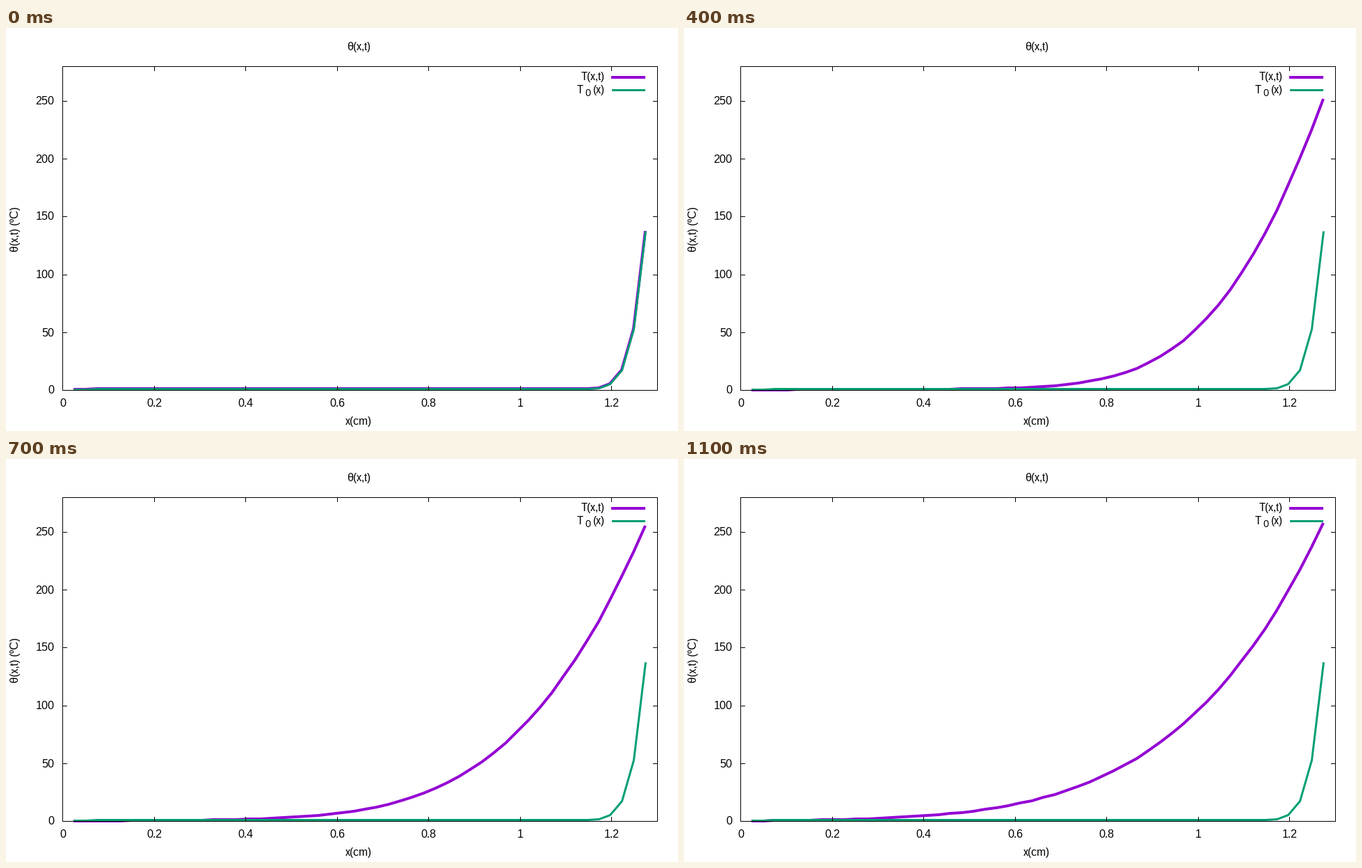
A matplotlib script for the animation above (1200 ms loop, 966x580 px).

```python
import numpy as np
import matplotlib.pyplot as plt
from matplotlib.animation import FuncAnimation

W, H, DPI = 966, 580, 100
PX = 72 / DPI                                # points per pixel
LEFT, RIGHT, TOP, BOTTOM = 81, 936, 55, 521
XMAX, YMAX = 1.3, 280
TICK = 6
PURPLE, GREEN = "#9400d3", "#009e73"
FRAMES, INTERVAL = 12, 100

# Heat equation with linear loss, implicit scheme on the interior nodes
NODES = 50
DX = XMAX / (NODES + 1)
RATE = 0.1135                                # D * dt / dx^2
LOSS = RATE * (3 * DX) ** 2
FIRST_STEPS, STEPS = 10, 100

SOLVE = np.linalg.inv((1 + 2 * RATE + LOSS) * np.eye(NODES)
                      - RATE * (np.eye(NODES, k=1) + np.eye(NODES, k=-1)))
WALL = np.zeros(NODES)
WALL[-1] = RATE * YMAX

plt.rcParams.update({"font.family": "Liberation Sans",
                     "text.hinting": "native",
                     "text.hinting_factor": 1})


def advance(temp, steps):
    for _ in range(steps):
        temp = SOLVE @ (temp + WALL)
    return temp


def to_px(x):
    return LEFT + (RIGHT - LEFT) * x / XMAX


def to_py(y):
    return BOTTOM - (BOTTOM - TOP) * y / YMAX


profiles = [advance(np.ones(NODES), FIRST_STEPS)]
while len(profiles) < FRAMES:
    profiles.append(advance(profiles[-1], STEPS))

node_x = np.floor(to_px(DX * np.arange(1, NODES + 1)))
curves = [np.round(to_py(p)) for p in profiles]

fig = plt.figure(figsize=(W / DPI, H / DPI), dpi=DPI, facecolor="white")
ax = fig.add_axes([0, 0, 1, 1])
ax.set_xlim(0, W)
ax.set_ylim(H, 0)
ax.axis("off")


def stroke(x, y, color, width, z):
    return ax.plot(x, y, color=color, lw=width * PX, solid_capstyle="butt",
                   solid_joinstyle="round", snap=False, zorder=z)[0]


def segment(x0, y0, x1, y1):
    """One-pixel black line covering both end pixels."""
    ax.fill([x0, x1 + 1, x1 + 1, x0], [y0, y0, y1 + 1, y1 + 1],
            color="black", lw=0, snap=False, zorder=5)


def label(x, y, text, ha="center", size=16, **kw):
    ax.text(x, y, text, ha=ha, va="baseline", fontsize=size * PX,
            color="black", zorder=6, **kw)


# Frame and ticks
for y in (TOP, BOTTOM):
    segment(LEFT, y, RIGHT, y)
for x in (LEFT, RIGHT):
    segment(x, TOP, x, BOTTOM)

for i in range(7):
    x = int(to_px(i / 5) + 0.5)
    segment(x, TOP, x, TOP + TICK)
    segment(x, BOTTOM - TICK, x, BOTTOM)
    label(x + 0.5, 545, f"{i / 5:g}")
for v in range(0, 251, 50):
    y = int(to_py(v) + 0.5)
    segment(LEFT, y, LEFT + TICK, y)
    segment(RIGHT - TICK, y, RIGHT, y)
    label(69.5, y + 5.5, str(v), ha="right")

# Titles
label(507.5, 32, "θ(x,t)")
label(506.5, 571, "x(cm)")
label(18, 289, "θ(x,t) (ºC)", rotation=90, rotation_mode="anchor")

# Key
label(860.5, 75, "T(x,t)", ha="right")
label(820.5, 94, "T", ha="left")
label(832.5, 98, "0", ha="left", size=14)
label(860.5, 94, "(x)", ha="right")
stroke([870, 919], [71, 71], PURPLE, 4, 2)
stroke([871, 919], [89.5, 89.5], GREEN, 3, 3)

# Curves
current = stroke(node_x, curves[0], PURPLE, 4, 2)
stroke(node_x + 0.5, curves[0] + 0.5, GREEN, 3, 3)


def update(i):
    current.set_ydata(curves[i])
    return current,


anim = FuncAnimation(fig, update, frames=FRAMES, interval=INTERVAL,
                     repeat=True, repeat_delay=0, blit=False)
plt.show()
```
